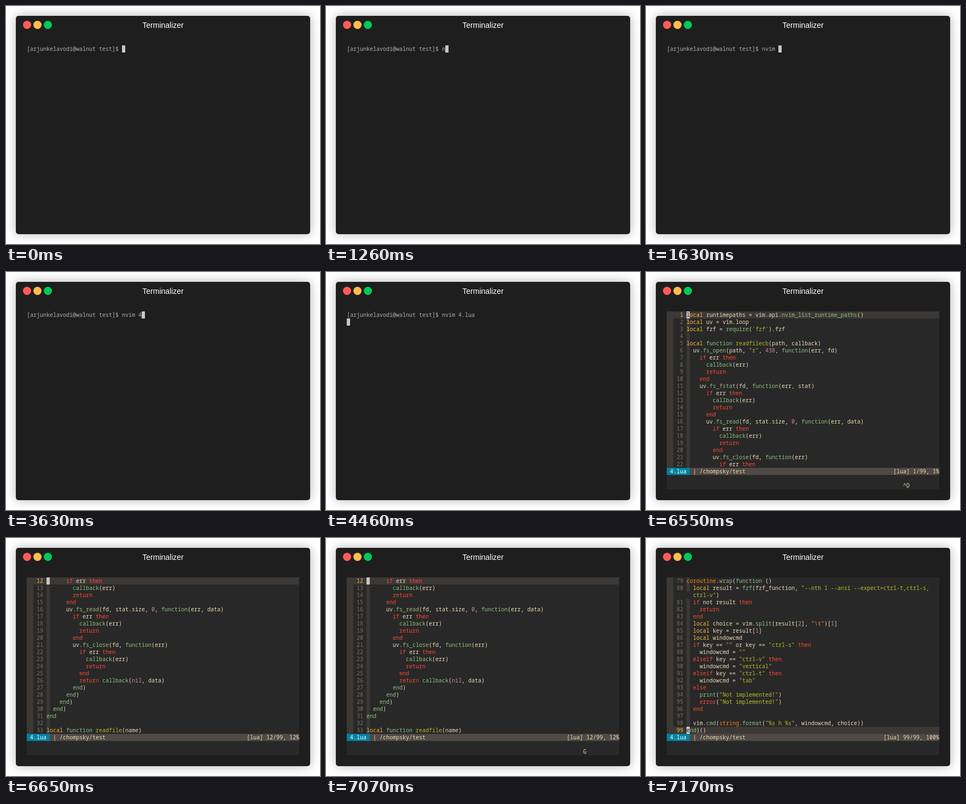
An HTML page that plays this animation: 574x435 px, repeating every 8 s.

```html
<!DOCTYPE html>
<html lang="en">
<head>
<meta charset="utf-8">
<title>Terminal</title>
<style>
  html, body { margin: 0; width: 100%; height: 100%; overflow: hidden; background: #fff; }
  .window {
    position: absolute; left: 18px; top: 18px; width: 538px; height: 399px;
    border-radius: 5px; background: #1e1e1e; box-shadow: 0 0 18px rgba(0, 0, 0, .3);
  }
  .title {
    position: absolute; left: 0; right: 0; top: 8px; text-align: center; color: #fff;
    font: 14px/18px "Liberation Sans", Arial, sans-serif;
  }
  .dot { position: absolute; top: 9px; width: 15px; height: 15px; border-radius: 50%; }
  #screen {
    position: absolute; left: 20px; top: 54px; width: 498px; height: 325px; overflow: hidden;
    font: 10px/13px "Noto Sans Mono", monospace; font-variant-ligatures: none;
  }
  #screen div { position: absolute; white-space: pre; }
  .str, .def { color: #b8bb26; }
  .key { color: #fabd2f; }
  .ctl { color: #fb4934; }
  .lib { color: #fe8019; }
  .fun { color: #8ec07c; }
  .num { color: #d3869b; }
</style>
</head>
<body>
<div class="window">
  <div class="dot" style="left:13px;background:#ff5c57"></div>
  <div class="dot" style="left:32px;background:#ffbd4d"></div>
  <div class="dot" style="left:51px;background:#00ca56"></div>
  <div class="title">Terminalizer</div>
  <div id="screen"></div>
</div>
<script>
const LOOP = 8000, CELL_W = 6, CELL_H = 13, COLS = 83, ROWS = 22;
const FG = '#ebdbb2', BG = '#282828', LIT = '#3c3836', CURSOR = '#c7c7c7';
const PROMPT = '[arjunkelavodi@walnut test]$ ';

const HEAD = `local runtimepaths = vim.api.nvim_list_runtime_paths()
local uv = vim.loop
local fzf = require('fzf').fzf

local function readfilecb(path, callback)
  uv.fs_open(path, "r", 438, function(err, fd)
    if err then
      callback(err)
      return
    end
    uv.fs_fstat(fd, function(err, stat)
      if err then
        callback(err)
        return
      end
      uv.fs_read(fd, stat.size, 0, function(err, data)
        if err then
          callback(err)
          return
        end
        uv.fs_close(fd, function(err)
          if err then
            callback(err)
            return
          end
          return callback(nil, data)
        end)
      end)
    end)
  end)
end

local function readfile(name)`.split('\n');

// A leading ">" marks the wrapped part of the line above.
const TAIL = String.raw`coroutine.wrap(function ()
  local result = fzf(fzf_function, "--nth 1 --ansi --expect=ctrl-t,ctrl-s,
>ctrl-v")
  if not result then
    return
  end
  local choice = vim.split(result[2], "\t")[1]
  local key = result[1]
  local windowcmd
  if key == "" or key == "ctrl-s" then
    windowcmd = ""
  elseif key == "ctrl-v" then
    windowcmd = "vertical"
  elseif key == "ctrl-t" then
    windowcmd = "tab"
  else
    print("Not implemented!")
    error("Not implemented!")
  end

  vim.cmd(string.format("%s h %s", windowcmd, choice))
end)()`.split('\n');

const SYNTAX = new RegExp([
  /(?<str>"[^"]*(?:"|$)|'[^']*'|^ctrl-v")/,
  /(?<key>\blocal\b)/,
  /(?<def>(?<=local function )\w+)/,
  /(?<fun>\bfunction\b|^end|\bend(?=\)))/,
  /(?<ctl>\b(?:if|then|elseif|else|return|end|error)\b)/,
  /(?<lib>\b(?:coroutine|string)\b)/,
  /(?<call>\w+(?=\())/,
  /(?<num>\b(?:\d+|nil)\b)/
].map(r => r.source).join('|'), 'g');

function highlight(line) {
  return line.replace(SYNTAX, (word, ...rest) => {
    const groups = rest.at(-1);
    const kind = Object.keys(groups).find(k => groups[k] !== undefined);
    const body = kind === 'str' ? word.replace('\\t', '<span class="lib">\\t</span>') : word;
    return `<span class="${kind === 'call' ? 'fun' : kind}">${body}</span>`;
  });
}

const at = (col, row) => `left:${col * CELL_W}px;top:${row * CELL_H}px;`;
const box = (col, row, cols, rows, color) =>
  `<div style="${at(col, row)}width:${cols * CELL_W}px;height:${rows * CELL_H}px;background:${color}"></div>`;
const text = (col, row, html, color = FG) =>
  `<div style="${at(col, row)}color:${color}">${html}</div>`;
const cursor = (col, row, char = '') =>
  box(col, row, 1, 1, CURSOR) + text(col, row, char, BG);

function shell(command, entered = false) {
  const line = PROMPT + command;
  return text(0, 0, line, '#afafaf') + (entered ? cursor(0, 1) : cursor(line.length, 0));
}

function editor(lines, first, cursorRow, percent, pending = '') {
  const current = first + lines.slice(0, cursorRow + 1).filter(l => l[0] !== '>').length - 1;
  const position = `[lua] ${current}/99, ${percent}%`;
  let html = box(0, 0, COLS, 25, BG) + box(0, 0, 2, ROWS, LIT) + box(2, cursorRow, COLS - 2, 1, LIT);
  let number = first;
  lines.forEach((line, row) => {
    if (line[0] === '>') {
      html += text(8, row, highlight(line.slice(1)));
      return;
    }
    html += box(6, row, 1, 1, LIT);
    html += text(2, row, String(number++).padStart(3), row === cursorRow ? '#fabd2f' : '#7c6f64');
    html += text(6, row, highlight(line));
  });
  html += cursor(6, cursorRow, lines[cursorRow][0]);
  html += box(0, ROWS, COLS, 1, '#504945') + box(0, ROWS, 7, 1, '#00839f');
  html += text(1, ROWS, '4.lua', '#fff') + text(8, ROWS, '| /chompsky/test');
  html += text(COLS - position.length, ROWS, position);
  return html + text(72, 24, pending);
}

const top22 = HEAD.slice(0, 22), half = HEAD.slice(11, 33);
const steps = [
  [0, shell('')],
  [1260, shell('n')],
  [1350, shell('nv')],
  [1440, shell('nvi')],
  [1540, shell('nvim')],
  [1630, shell('nvim ')],
  [3630, shell('nvim 4')],
  [3770, shell('nvim 4.')],
  [3970, shell('nvim 4.l')],
  [4160, shell('nvim 4.lu')],
  [4200, shell('nvim 4.lua')],
  [4460, shell('nvim 4.lua', true)],
  [4550, editor(top22, 1, 0, 1)],
  [6550, editor(top22, 1, 0, 1, '^D')],
  [6650, editor(half, 12, 0, 12)],
  [7070, editor(half, 12, 0, 12, 'G')],
  [7170, editor(TAIL, 79, 21, 100)]
];

const screenEl = document.getElementById('screen');
const start = performance.now();
let shown = null;

function tick() {
  const time = (performance.now() - start) % LOOP;
  const step = steps.findLast(([from]) => from <= time);
  if (step !== shown) {
    shown = step;
    screenEl.innerHTML = step[1];
  }
  requestAnimationFrame(tick);
}
tick();
</script>
</body>
</html>
```
